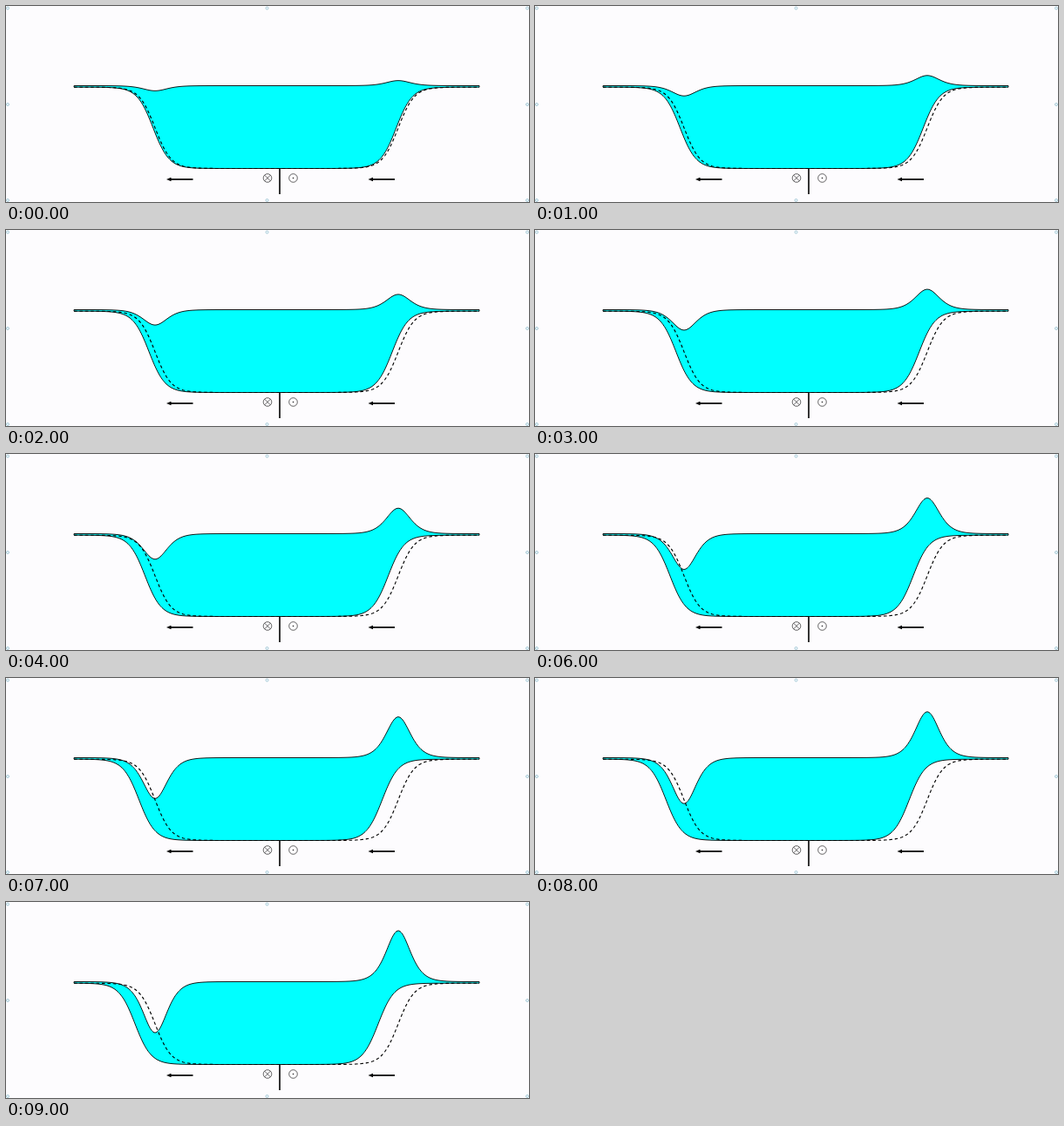
Write an HTML page that moves like this. It is 600 px wide and 225 px high and loops after 10 s.

```html
<!DOCTYPE html>
<html lang="en">
<head>
<meta charset="utf-8">
<title>Basin displacement</title>
<style>
  html, body { margin: 0; width: 100%; height: 100%; overflow: hidden; background: #fdfcfe; }
  svg { display: block; width: 600px; height: 225px; }
</style>
</head>
<body>
<svg viewBox="0 0 600 225" fill="none" stroke="#000">
  <defs>
    <g id="arrow">
      <path d="M30.5 0H3" stroke-width="1.7"/>
      <path d="M0 0L5.5 -2.3V2.3Z" fill="#000" stroke="none"/>
    </g>
  </defs>
  <g id="handles" fill="#f4fbfd" stroke="#86b6c9" stroke-width=".7"></g>
  <path id="water" fill="#0ff" stroke-width=".9"/>
  <path id="rest" stroke-width="1.15" stroke-dasharray="3.5 2.9"/>
  <path d="M314 187V216" stroke-width="1.6"/>
  <use href="#arrow" x="184" y="199"/>
  <use href="#arrow" x="415.5" y="199"/>
  <g stroke="#222" stroke-width=".7">
    <circle cx="300" cy="197.5" r="4.8"/>
    <path d="M296.7 194.2l6.6 6.6m0 -6.6l-6.6 6.6"/>
    <circle cx="329.5" cy="197.5" r="4.8"/>
    <circle cx="329.5" cy="197.5" r=".8" fill="#222" stroke="none"/>
  </g>
</svg>
<script>
const LEFT = 78, RIGHT = 543;
const WEST = 171, EAST = 450, SLOPE_WIDTH = 18.4;
const SURFACE = 91.5, SHORE = 93.2, DEPTH = 93.3;
const SHIFT_PER_STEP = 2.3, RISE_PER_STEP = 5.85;
const STEPS = 10, STEP_MS = 1000;

const water = document.getElementById('water');
const rest = document.getElementById('rest');

const step = (x, center) => Math.tanh((x - center) / SLOPE_WIDTH);
const bump = (x, center) => 1 - step(x, center) ** 2;

const bed = (x, shift) =>
  SHORE + DEPTH / 2 * (step(x + shift, WEST) - step(x + shift, EAST));
const surface = (x, rise) =>
  SURFACE + rise * (bump(x, WEST) - bump(x, EAST));

function trace(curve) {
  const points = [];
  for (let x = LEFT; x <= RIGHT; x++) points.push(`${x} ${curve(x).toFixed(2)}`);
  return points;
}

function draw(n) {
  const top = trace(x => surface(x, n * RISE_PER_STEP));
  const bottom = trace(x => bed(x, n * SHIFT_PER_STEP)).reverse();
  water.setAttribute('d', `M${top.concat(bottom).join('L')}Z`);
}

rest.setAttribute('d', `M${trace(x => bed(x, 0)).join('L')}`);

const handles = document.getElementById('handles');
for (const x of [2, 299.5, 598]) {
  for (const y of [2.5, 113, 223]) {
    if (x === 299.5 && y === 113) continue;
    handles.innerHTML += `<circle cx="${x}" cy="${y}" r="1.5"/>`;
  }
}

const start = performance.now();
let shown = 0;

function tick() {
  const elapsed = Math.max(0, performance.now() - start);
  const n = Math.floor(elapsed / STEP_MS) % STEPS + 1;
  if (n !== shown) draw(shown = n);
  requestAnimationFrame(tick);
}
tick();
</script>
</body>
</html>
```
